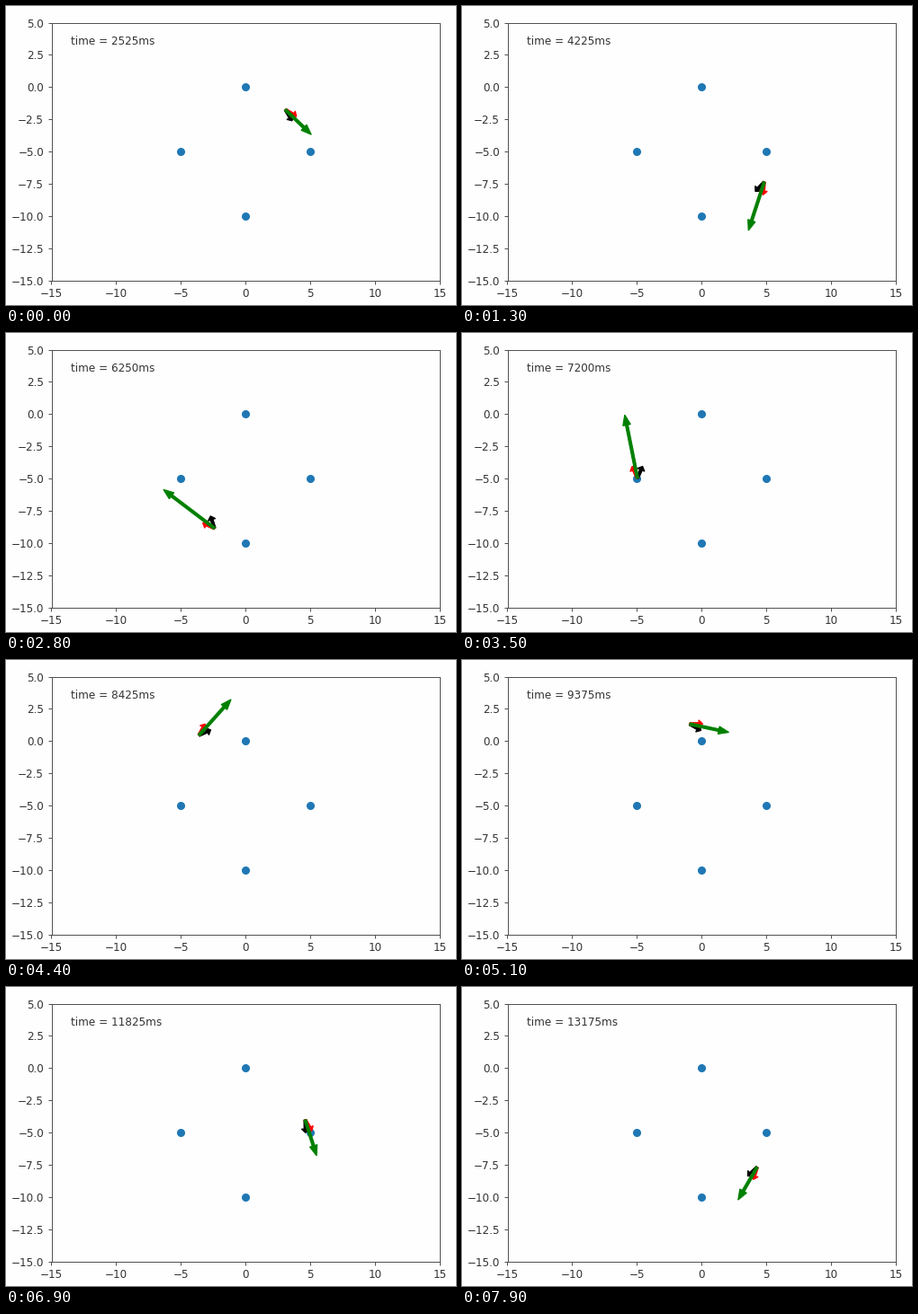
A matplotlib script for the animation above (8000 ms loop, 500x333 px).

```python
import numpy as np
import matplotlib.pyplot as plt
from matplotlib.animation import FuncAnimation
from matplotlib.patches import FancyArrow

W, H, DPI = 500, 333, 100
FRAMES, STEP_MS = 80, 100
K = 0.868  # scale of point sizes on this stage
INK, LINE, PAPER = "0.2", "0.3", "#fefefe"

plt.rcParams.update({
    "font.family": "DejaVu Sans",
    "font.size": 10 * K,
    "text.color": INK,
    "axes.edgecolor": LINE, "axes.facecolor": PAPER,
    "axes.linewidth": 0.8 * K,
})
for axis in ("xtick", "ytick"):
    plt.rcParams.update({
        f"{axis}.color": LINE, f"{axis}.labelcolor": INK,
        f"{axis}.major.width": 0.8 * K,
        f"{axis}.major.size": 3.5 * K,
        f"{axis}.major.pad": 3.5 * K,
    })

# points the mover passes, with the time in seconds
TIMES = np.array([2.525, 4.225, 5.175, 7.2, 8.425, 10.325, 13.175])
POINTS = np.array([(3.08, -1.76), (4.84, -7.37), (2.18, -10.04), (-4.96, -4.97),
                   (-3.6, 0.45), (1.85, -0.18), (4.29, -7.69)])
V_START, V_END = (2.0, -1.93), (-1.47, -2.54)


def spline_slopes(t, p, first, last):
    """Velocities at the points of a smooth cubic spline with given ends."""
    h = np.diff(t)
    d = np.diff(p, axis=0) / h[:, None]
    m, rhs = np.eye(len(t)), np.zeros_like(p)
    rhs[0], rhs[-1] = first, last
    for i in range(1, len(t) - 1):
        a, b = h[i - 1], h[i]
        m[i, i - 1:i + 2] = b, 2 * (a + b), a
        rhs[i] = 3 * (b * d[i - 1] + a * d[i])
    return np.linalg.solve(m, rhs)


SLOPES = spline_slopes(TIMES, POINTS, V_START, V_END)


def state(t):
    """Position and velocity on the path."""
    k = int(np.clip(np.searchsorted(TIMES, t, side="right") - 1, 0, len(TIMES) - 2))
    span = TIMES[k + 1] - TIMES[k]
    u = (t - TIMES[k]) / span
    p, q, a, b = POINTS[k], POINTS[k + 1], SLOPES[k], SLOPES[k + 1]
    s = u * u * (3 - 2 * u)
    pos = p + s * (q - p) + span * u * (1 - u) * ((1 - u) * a - u * b)
    vel = (6 * u * (1 - u) * (q - p) / span
           + (3 * u * u - 4 * u + 1) * a + (3 * u * u - 2 * u) * b)
    return pos, vel


def clock(i):
    """Simulated time in ms, counted in ticks of 25."""
    return 2525 + 25 * int(np.interp(i, (0, 13, 79), (0, 68.07, 426.4)))


fig = plt.figure(figsize=(W / DPI, H / DPI), dpi=DPI, facecolor=PAPER)
ax = fig.add_axes([50.5 / W, 1 - 305.6 / H, 431.4 / W, 287.1 / H])
ax.set(xlim=(-15, 15), ylim=(-15, 5))
ax.set_xticks(np.arange(-15, 16, 5))
ax.set_yticks(np.arange(-15, 5.1, 2.5))
ax.scatter([0, 5, 0, -5], [0, -5, -10, -5], s=36 * K ** 2,
           color="tab:blue", linewidths=1.5 * K)
label = ax.text(-13.5, 3.3, "")


def add_arrow(color, head):
    arrow = FancyArrow(0, 0, 1, 0, width=0.2, head_width=0.6, head_length=head,
                       length_includes_head=True, color=color, lw=K)
    return ax.add_patch(arrow)


pull = add_arrow("black", 0.3)
heading = add_arrow("red", 0.3)
speed = add_arrow("green", 0.8)


def point(arrow, pos, vec):
    arrow.set_data(x=pos[0], y=pos[1], dx=vec[0], dy=vec[1])


def unit(angle):
    return np.cos(angle), np.sin(angle)


def draw(i):
    ms = clock(i)
    pos, vel = state(ms / 1000)
    angle = np.arctan2(vel[1], vel[0])
    # the pull turns further inward as the mover speeds up
    point(pull, pos, unit(angle + np.radians(10 - 9 * np.hypot(*vel))))
    point(heading, pos, unit(angle + np.radians(13)))
    point(speed, pos, vel)
    label.set_text(f"time = {ms}ms")
    return pull, heading, speed, label


anim = FuncAnimation(fig, draw, frames=FRAMES, interval=STEP_MS,
                     repeat=True, repeat_delay=0, blit=False)
plt.show()
```
